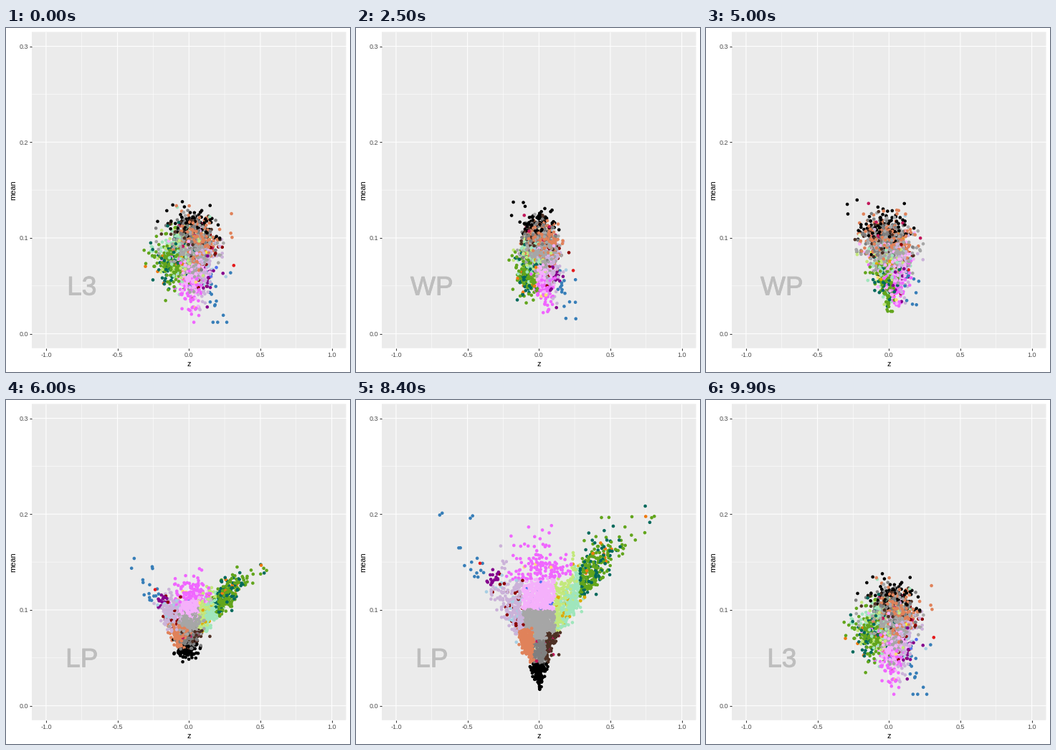
Recreate the animation shown at these times as a matplotlib script. Size 480 px wide and 480 px high, loop 10000 ms.

```python
import numpy as np
import matplotlib
import matplotlib.pyplot as plt
from matplotlib.animation import FuncAnimation
from matplotlib.patheffects import withStroke

SIZE, DPI, FRAMES = 480, 72, 100
matplotlib.rcParams["font.family"] = "Liberation Sans"
matplotlib.rcParams["path.snap"] = False
rng = np.random.default_rng(5)


def arm(y, side):
    """Points that bend away from the middle as the mean grows."""
    z = side * 10 * y ** 1.7 * rng.normal(1, .2, y.size)
    return np.column_stack([z, y])


def fan():
    """The LP cloud: a narrow core with a wing on each side."""
    y = rng.normal(.09, .035, 1750)
    core = np.column_stack([y * rng.normal(-.05, .9, y.size), y])
    right = arm(rng.normal(.125, .03, 620), 1)
    left = arm(.045 + rng.gamma(2, .022, 440), -1)
    points = np.vstack([core, right, left])
    points = points[points[:, 1] > .009]
    return rng.permutation(points)


def paint(z, y):
    """Colour each point by its region, with a few accents mixed in."""
    u = z / y + rng.normal(0, .25, z.size)
    # test, main colour, accents and their shares; the first match counts
    regions = [
        (y < .04, "#000000", {}),
        ((z > .31) & (y > .115), "#62a51c", {"#00695c": .26, "#ee7a10": .04}),
        ((z < -.42) & (y > .13), "#377eb8", {"#e41a1c": .05}),
        ((z < -.3) & (y > .13), "#85008d", {"#e41a1c": .04}),
        ((abs(z) < .25) & (y > .137), "#f066ff", {"#fbdf70": .02}),
        ((z < -.045) & (z > -.17) & (y < .08), "#e0825a", {}),
        ((z > .05) & (y < .075), "#4d3024", {"#c2185b": .15}),
        ((z > .12) & (u > 1.9), "#9fe6bc", {"#dfaa00": .03}),
        (z > .12, "#c3e87c", {"#dfaa00": .06}),
        (z < -.125, "#cbb2d9", {"#a6cee3": .17, "#8b0000": .07}),
        (y < .066, "#7f7f7f", {"#c2185b": .06, "#e4fbd0": .02}),
        (y < .102, "#a6a6a6", {"#f2f23c": .01}),
        (y < 1, "#f5b0fb", {"#4f6ff0": .045}),
    ]
    colors = np.empty(z.size, dtype="<U7")
    for test, main, accents in regions:
        hit = test & (colors == "")
        shares = list(accents.values())
        colors[hit] = rng.choice([main, *accents], hit.sum(),
                                 p=[1 - sum(shares), *shares])
    return colors


def scatter_around(z, y, spread):
    """Noise with a few strays, wider where the mean is higher."""
    dz, dy = np.clip(rng.standard_t(6, (2, z.size)), -4.2, 4.2)
    y = np.maximum(y + .0095 * dy, .012)
    return np.column_stack([z + spread * dz * y / .08, y])


lp = fan()
z, y = lp.T
colors = paint(z, y)
l3 = scatter_around(.02 - .3 * z, .125 - .5 * y + .06 * np.maximum(z, 0), .046)
wp = scatter_around(.8 * y - .07 - .2 * z, .128 - .5 * y, .05)

STATES = [("L3", l3), ("WP", wp), ("LP", lp)]
# first frame, last frame, from state, to state
MOVES = [(16, 33, 0, 1), (49, 66, 1, 2), (83, 99, 2, 0)]

fig = plt.figure(figsize=(SIZE / DPI, SIZE / DPI), dpi=DPI, facecolor="white")
ax = fig.add_axes([36 / SIZE, 33.3 / SIZE, 438.5 / SIZE, 441.2 / SIZE],
                  facecolor="#ebebeb")
ax.set(xlim=(-1.1, 1.1), ylim=(-.015, .315))
ax.set_axisbelow(True)
ax.spines[:].set_visible(False)

xt, yt = np.arange(-1, 1.1, .5), np.arange(0, .31, .1)
ax.set_xticks(xt, [f"{t:.1f}" for t in xt])
ax.set_yticks(yt, [f"{t:.1f}" for t in yt])
ax.set_xticks(xt[:-1] + .25, minor=True)
ax.set_yticks(yt[:-1] + .05, minor=True)
ax.grid(which="major", color="white", lw=1.07)
ax.grid(which="minor", color="white", lw=.53)
ax.tick_params(which="major", length=2.75, width=1.07, pad=2.2, color="#333333",
               labelsize=9, labelcolor="#4d4d4d")
ax.tick_params(which="minor", length=0)
fig.text(255.3 / SIZE, 8 / SIZE, "z", size=11, ha="center", va="baseline")
fig.text(10 / SIZE, 254 / SIZE, "mean", size=11, rotation=90,
         ha="center", va="center")

GREY = "#bebebe"
label = ax.text(-.75, .0405, "L3", size=37, color=GREY, ha="center", va="baseline",
                path_effects=[withStroke(linewidth=.9, foreground=GREY)])
dots = ax.scatter(*l3.T, s=4.6 ** 2, c=colors, linewidths=0, zorder=3)


def pose(k):
    """Start state, end state and progress at frame k."""
    now = 0
    for first, last, a, b in MOVES:
        if first <= k <= last:
            return a, b, (k - first) / (last - first)
        if k > last:
            now = b
    return now, now, 0


def draw(k):
    a, b, p = pose(k)
    dots.set_offsets((1 - p) * STATES[a][1] + p * STATES[b][1])
    label.set_text(STATES[b if p >= .5 else a][0])
    return dots, label


anim = FuncAnimation(fig, draw, frames=FRAMES, interval=100,
                     repeat=True, repeat_delay=0)
plt.show()
```
